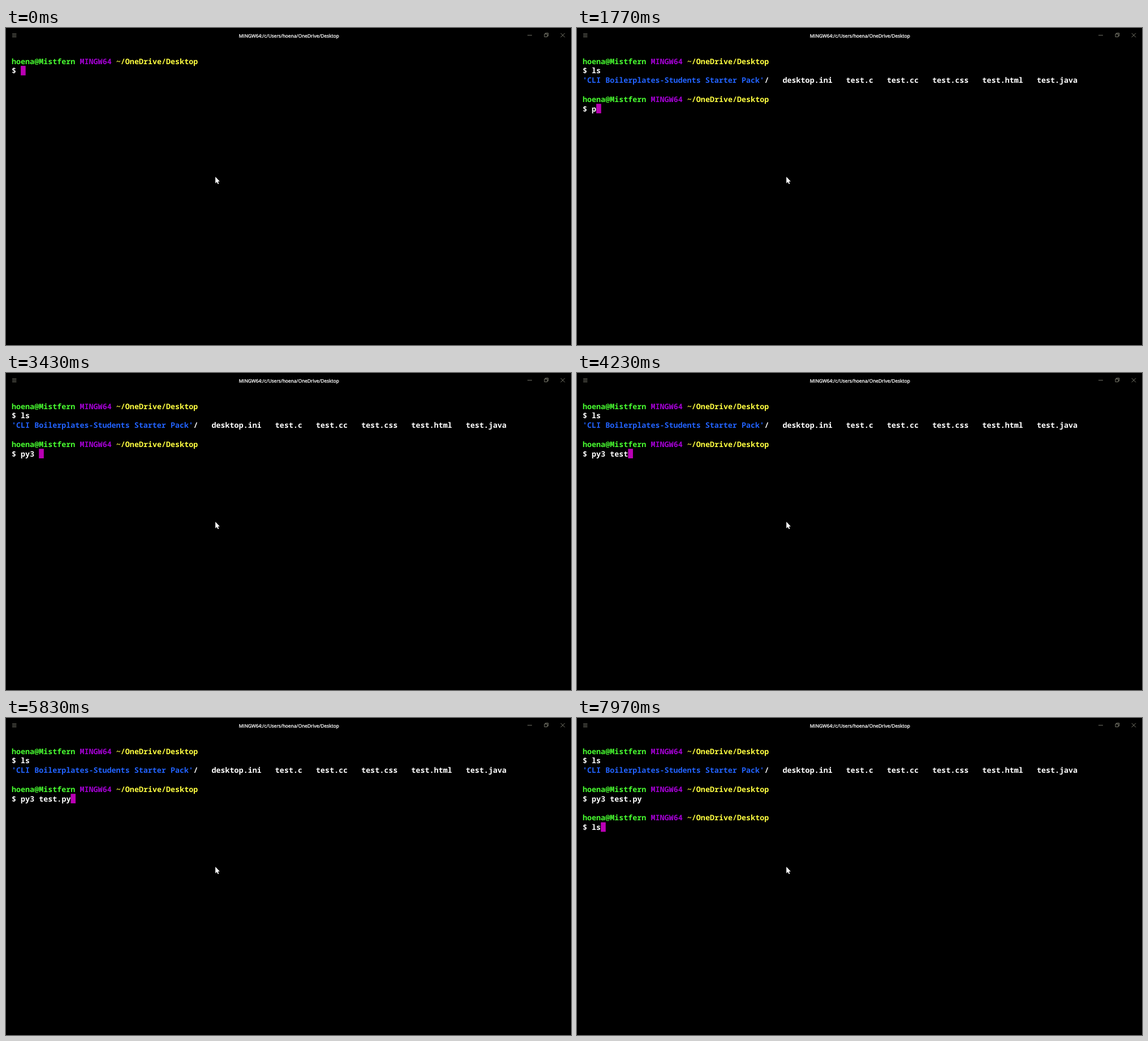
Recreate the animation shown at these times as an HTML page. Size 999 px wide and 561 px high, loop 8 s.

```html
<!DOCTYPE html>
<html lang="en">
<head>
<meta charset="utf-8">
<title>Terminal</title>
<style>
  html, body { margin: 0; width: 100%; height: 100%; overflow: hidden; background: #000; }
  svg { display: block; width: 999px; height: 561px; }
  text { white-space: pre; text-rendering: geometricPrecision; }
  #screen { font: 600 13.392px "Noto Sans Mono", "DejaVu Sans Mono", monospace; }
  #title {
    font: 500 8.37px "Open Sans", "Noto Sans", sans-serif;
    fill: #fff; stroke: #fff; stroke-width: .3; text-anchor: middle;
  }
  .icon { fill: none; stroke: #98988a; stroke-width: .8; }
  .user { fill: #48ff30; }
  .system { fill: #a400d4; }
  .path { fill: #ffff40; }
  .dir { fill: #2263ff; }
  .plain { fill: #fff; }
</style>
</head>
<body>
<svg viewBox="0 0 999 561">
  <rect width="999" height="561" fill="#000"/>
  <text id="title" x="500.3" y="16.6">MINGW64:/c/Users/hoena/OneDrive/Desktop</text>
  <g class="icon">
    <path d="M11 10.5h7.4M11 13.1h7.4M11 15.7h7.4"/>
    <path d="M922 12.9h8"/>
    <path d="M952 10.7h5v5h-5zM953.7 10.5v-1.5h5v5h-1.5"/>
    <path d="M980.8 9.2l7.2 7.2M988 9.2l-7.2 7.2"/>
  </g>
  <g id="screen"><rect id="caret" width="8.6" height="16.8" fill="#ba00b4"/></g>
  <path fill="#fff" d="M370.2 263.2V274.8L372.8 272.4L374.7 276.3L376.4 275.5L374.6 271.7L377.9 271.4Z"/>
</svg>
<script>
const LOOP = 8000, LEFT = 10, TOP = 50.2, CELL_W = 8.035, CELL_H = 16.8, ASCENT = 13.3;
const screen = document.getElementById('screen');
const caret = document.getElementById('caret');
const runs = [];
const caretSteps = [];

function put(time, row, col, style, string) {
  const el = document.createElementNS('http://www.w3.org/2000/svg', 'text');
  el.setAttribute('x', LEFT + col * CELL_W);
  el.setAttribute('y', TOP + row * CELL_H + ASCENT);
  el.setAttribute('class', style);
  el.textContent = string;
  screen.append(el);
  runs.push({ time, el });
}

function moveCaret(time, row, col) {
  caretSteps.push({ time, row, col });
}

function prompt(time, row) {
  put(time, row, 0, 'user', 'hoena@Mistfern');
  put(time, row, 15, 'system', 'MINGW64');
  put(time, row, 23, 'path', '~/OneDrive/Desktop');
  put(time, row + 1, 0, 'plain', '$');
  moveCaret(time, row + 1, 2);
}

function type(row, string, times) {
  times.forEach((time, i) => {
    put(time, row, 2 + i, 'plain', string[i]);
    moveCaret(time, row, 3 + i);
  });
}

prompt(0, 0);
type(1, 'ls', [30, 130]);
moveCaret(330, 2, 0);
put(430, 2, 0, 'dir', "'CLI Boilerplates-Students Starter Pack'");
put(430, 2, 40, 'plain', '/   desktop.ini   test.c   test.cc   test.css   test.html   test.java');
moveCaret(430, 3, 0);
prompt(640, 4);
type(5, 'py3 test.py', [1770, 2030, 2570, 3100, 3830, 3930, 4070, 4200, 5030, 5470, 5770]);
moveCaret(6470, 6, 0);
prompt(6900, 7);
type(8, 'ls', [7770, 7870]);

function draw(t) {
  for (const run of runs) run.el.style.display = t >= run.time ? '' : 'none';
  const { row, col } = caretSteps.filter(step => step.time <= t).pop();
  caret.setAttribute('x', LEFT + col * CELL_W);
  caret.setAttribute('y', TOP + row * CELL_H);
}

const start = performance.now();
function frame(now) {
  draw(Math.max(0, now - start) % LOOP);
  requestAnimationFrame(frame);
}
draw(0);
requestAnimationFrame(frame);
</script>
</body>
</html>
```
